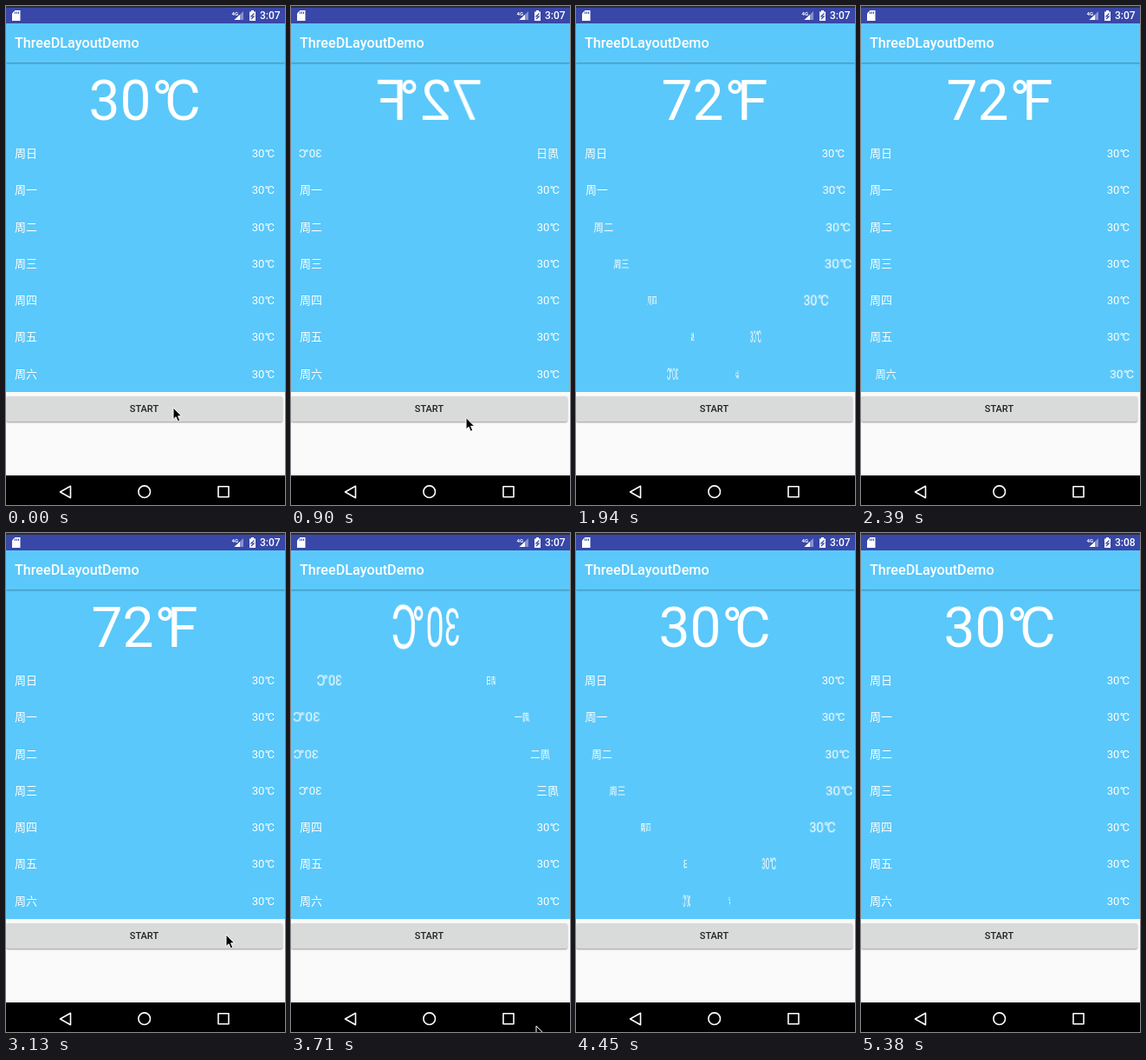
Recreate the animation shown at these times as an HTML page. Size 322 by 574 pixels, loop 5480 ms.

```html
<!DOCTYPE html>
<html lang="zh-CN">
<head>
<meta charset="utf-8">
<title>ThreeDLayoutDemo</title>
<style>
html, body { margin: 0; width: 100%; height: 100%; overflow: hidden; background: #fafafa; }
#stage { position: relative; width: 322px; height: 574px; overflow: hidden; background: #fafafa;
  color: #fff; font-family: Roboto, "Noto Sans CJK SC", "Noto Sans CJK", sans-serif; }
#stage > * { position: absolute; }
#status { left: 0; top: 0; width: 322px; height: 20px; background: #3847a8; box-shadow: inset 0 2px #2d2d36; }
#clock { left: 293px; top: 4px; font: 500 12px/14px Roboto, sans-serif; }
#sky { left: 0; top: 20px; width: 322px; height: 424px; background: #5ac8fa; }
#bar { left: 0; top: 20px; width: 322px; height: 45px; background: #5ac8fa;
  box-shadow: 0 1px 2px rgba(0,0,0,.32); font: 500 16.2px/46px Roboto, sans-serif; text-indent: 10px; }
.row { left: 0; width: 320px; box-sizing: border-box; padding: 0 10px; white-space: nowrap;
  display: flex; justify-content: space-between; font-size: 13px; height: 42px; line-height: 42px; }
#big { top: 67px; height: 84px; line-height: 86px; font-size: 64px; justify-content: center; }
.deg { margin-left: .015em; letter-spacing: -.145em; }
#button { left: 0; top: 449px; width: 319px; height: 29px; border-radius: 2px; background: #d9dbda;
  box-shadow: 0 1px 2px rgba(0,0,0,.4); color: #222; text-align: center; font: 500 11px/29px Roboto, sans-serif; }
#nav { left: 0; top: 540px; width: 322px; height: 34px; background: #000; }
#icons, #cursor { left: 0; top: 0; overflow: visible; }
</style>
</head>
<body>
<div id="stage">
  <div id="sky"></div>
  <div id="status"></div>
  <div id="bar">ThreeDLayoutDemo</div>
  <div id="clock">3:07</div>
  <div id="big" class="row"></div>
  <div id="button">START</div>
  <div id="nav"></div>
  <svg id="icons" width="322" height="574" fill="none">
    <path d="M10.5 5H16.5V17H7V8.5Z" fill="#fff"/>
    <path d="M10.5 6.5V9M12.5 6.5V9M14.5 6.5V9" stroke="#3847a8"/>
    <path d="M274 6V16H263.5Z" fill="#fff" fill-opacity=".4"/>
    <path d="M270 10V16H263.5Z" fill="#fff"/>
    <text x="260.5" y="10.5" fill="#fff" font-family="Roboto, sans-serif" font-weight="700" font-size="6">4G</text>
    <path d="M281 6.5H283V5H286V6.5H288V17H281Z" fill="#fff"/>
    <path d="M286.5 8.5L282.8 12H286.2L283 15" stroke="#3847a8" stroke-width="1.1"/>
    <g stroke="#fff" stroke-width="1.6" stroke-linejoin="round">
      <path d="M62.5 559L74.5 552.3V565.7Z"/>
      <circle cx="159.7" cy="558.7" r="6.8"/>
      <rect x="245" y="552.8" width="12" height="12"/>
    </g>
  </svg>
  <svg id="cursor" width="12" height="18">
    <path d="M.5 .5V14L3.6 11.2L5.8 16.3L8.3 15.2L6.1 10.3H10.2Z" fill="#000" stroke="#fff" stroke-width="1"/>
  </svg>
</div>
<script>
const LOOP = 5480, STEP = 148.3, LENGTH = 1040, STAGGER = LENGTH / 10;
const SPINS = [
  { start: 845, lead: 40, text: ['72', 'F'] },
  { start: 3348, lead: 10, text: ['30', 'C'] }
];
// Each visit of the pointer: time, x, y
const POINTER = [
  [[700, 193, 462], [1490, 229, 508], [1790, 248, 566]],
  [[2810, 262, 565], [2980, 257, 490], [3120, 254, 462], [3346, 254, 462], [3560, 270, 505], [3716, 283, 567]]
];
const $ = id => document.getElementById(id);
const big = $('big'), cursor = $('cursor'), clock = $('clock');
const degrees = (value, unit) => `<span>${value}<span class="deg">°</span>${unit}</span>`;

const rows = [...'日一二三四五六'].map((day, i) => {
  const row = document.createElement('div');
  row.className = 'row';
  row.style.top = 149 + i * 42.27 + 'px';
  row.innerHTML = `<span>周${day}</span>` + degrees('30', 'C');
  $('stage').insertBefore(row, $('button'));
  return row;
});

// A spin jumps to the back side, then eases round to the front.
function turn(element, elapsed) {
  const spinning = elapsed >= 0 && elapsed < LENGTH;
  const angle = 270 - 90 * Math.cos(Math.PI * elapsed / LENGTH);
  element.style.transform = spinning ? `perspective(440px) rotateY(${angle}deg)` : 'none';
}

function pointerAt(time) {
  const path = POINTER.find(p => time <= p[p.length - 1][0] + 10);
  if (!path || (path !== POINTER[0] && time < path[0][0])) return null;
  if (time <= path[0][0]) return path[0].slice(1);
  const next = path.findIndex(key => key[0] >= time);
  if (next < 0) return path[path.length - 1].slice(1);
  const [t0, x0, y0] = path[next - 1], [t1, x1, y1] = path[next];
  const f = (time - t0) / (t1 - t0);
  return [x0 + (x1 - x0) * f, y0 + (y1 - y0) * f];
}

let shown = '';
function draw(now) {
  // The screen refreshes in even steps.
  const time = 750 + Math.floor((now - 742) / STEP) * STEP;
  const current = time < 2700 ? 0 : 1;
  const { start, lead } = SPINS[current];
  const bigElapsed = time - start + lead;
  const label = degrees(...SPINS[bigElapsed < 0 ? 1 - current : current].text);
  if (label !== shown) big.innerHTML = shown = label;
  turn(big, bigElapsed);
  rows.forEach((row, i) => turn(row, time - start - i * STAGGER));

  const spot = pointerAt(time);
  cursor.style.display = spot ? 'block' : 'none';
  if (spot) cursor.style.transform = `translate(${spot[0] - .5}px, ${spot[1] - .5}px)`;
  clock.textContent = now < 5380 ? '3:07' : '3:08';
}

const begin = performance.now();
function tick() {
  draw((performance.now() - begin) % LOOP);
  requestAnimationFrame(tick);
}
tick();
</script>
</body>
</html>
```
